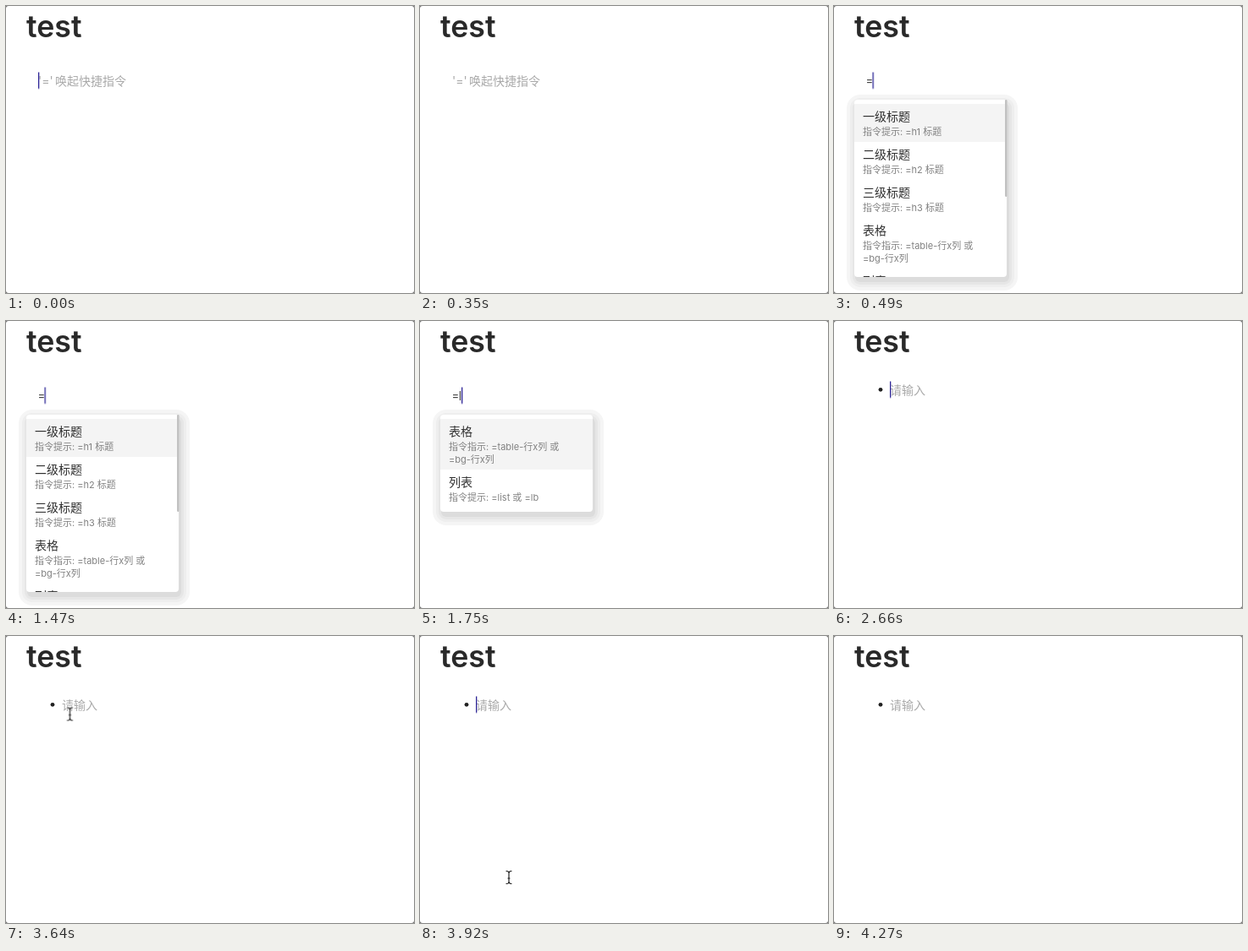
Animation of 482 by 340 pixels, one loop 4760 ms. Source, as an HTML page:

```html
<!DOCTYPE html>
<html lang="zh-CN">
<head>
<meta charset="utf-8">
<title>test</title>
<style>
html, body { margin: 0; width: 100%; height: 100%; overflow: hidden; background: #666; }
svg { display: block; width: 482px; height: 340px; background: #fff; border-radius: 3px; }
text { font: 14px Inter, "Noto Sans CJK SC", "Noto Sans CJK", sans-serif; fill: #303030; }
.title { font-size: 35.7px; font-weight: 600; fill: #292929; }
.ghost { fill: #a9a9a9; }
.typed { font-family: Roboto, "Noto Sans", sans-serif; fill: #444; }
.hint { font-size: 11px; fill: #808080; }

/* Every part shares one 4760 ms clock and changes in hard steps */
.part { opacity: 0; animation: 4760ms step-end infinite; }
.empty { animation-name: empty; }
.all { animation-name: all; }
.two { animation-name: two; }
.one { animation-name: one; }
.bullets { animation-name: bullets; }
.caret { animation-name: caret; fill: #2c2496; }
.mouse { animation-name: mouse; }

@keyframes empty { 0% { opacity: 1 } 10.294%, 100% { opacity: 0 } }
@keyframes all { 0% { opacity: 0 } 10.294% { opacity: 1 } 36.764%, 100% { opacity: 0 } }
@keyframes two { 0% { opacity: 0 } 36.764% { opacity: 1 } 42.647%, 100% { opacity: 0 } }
@keyframes one { 0% { opacity: 0 } 42.647% { opacity: 1 } 55.882%, 100% { opacity: 0 } }
@keyframes bullets { 0% { opacity: 0 } 55.882%, 100% { opacity: 1 } }
@keyframes caret {
  0% { opacity: 1; transform: translate(38px, 78.5px) }
  7.352% { opacity: 0; transform: translate(38px, 78.5px) }
  10.294% { opacity: 1; transform: translate(45.5px, 78.5px) }
  20.588% { opacity: 0; transform: translate(45.5px, 78.5px) }
  30.882% { opacity: 1; transform: translate(45.5px, 78.5px) }
  36.764% { opacity: 1; transform: translate(49px, 78.5px) }
  42.647% { opacity: 1; transform: translate(52.5px, 78.5px) }
  52.941% { opacity: 0; transform: translate(52.5px, 78.5px) }
  55.882% { opacity: 1; transform: translate(66px, 71.5px) }
  67.647% { opacity: 0; transform: translate(66px, 71.5px) }
  77.941% { opacity: 1; transform: translate(66px, 71.5px) }
  89.705%, 100% { opacity: 0; transform: translate(66px, 71.5px) }
}
@keyframes mouse {
  0% { opacity: 0; transform: translate(75.5px, 92.5px) }
  76.47% { opacity: 1; transform: translate(75.5px, 92.5px) }
  77.941% { opacity: 1; transform: translate(152px, 112px) }
  79.411% { opacity: 1; transform: translate(221px, 164px) }
  80.882% { opacity: 1; transform: translate(190px, 236px) }
  82.352% { opacity: 1; transform: translate(105px, 286px) }
  83.823% { opacity: 1; transform: translate(17px, 312px) }
  85.294%, 100% { opacity: 0; transform: translate(17px, 312px) }
}
</style>
</head>
<body>
<svg viewBox="0 0 482 340">
  <defs>
    <clipPath id="frame"><rect x="24" y="111" width="180" height="210" rx="4"/></clipPath>
    <path id="beam" d="M-3 -7.5Q0 -7.5 0 -5Q0 -7.5 3 -7.5M0 -5V5M-3 7.5Q0 7.5 0 5Q0 7.5 3 7.5M-1 1H1"/>
    <g id="table">
      <text x="34" y="20">表格</text>
      <text class="hint" x="34" y="37">指令指示: =table-行x列 或</text>
      <text class="hint" x="34" y="52">=bg-行x列</text>
    </g>
    <g id="list">
      <text x="34" y="20">列表</text>
      <text class="hint" x="34" y="37">指令提示: =list 或 =lb</text>
    </g>
  </defs>

  <text class="title" x="24" y="37">test</text>

  <g class="part empty">
    <text class="ghost" x="38" y="93.5">'='</text>
    <text class="ghost" x="58" y="93.5">唤起快捷指令</text>
  </g>

  <g class="part all">
    <text class="typed" x="38" y="93.5">=</text>
    <g class="panel" data-height="210"></g>
    <g clip-path="url(#frame)">
      <rect x="24" y="116" width="178" height="45" fill="#f4f4f4"/>
      <text x="34" y="136">一级标题</text>
      <text class="hint" x="34" y="153">指令提示: =h1 标题</text>
      <text x="34" y="181">二级标题</text>
      <text class="hint" x="34" y="198">指令提示: =h2 标题</text>
      <text x="34" y="226">三级标题</text>
      <text class="hint" x="34" y="243">指令提示: =h3 标题</text>
      <use href="#table" y="251"/>
      <use href="#list" y="311"/>
    </g>
    <rect x="202" y="111" width="2.5" height="115" rx="1.2" fill="#c2c2c2"/>
  </g>

  <g class="part two">
    <text class="typed" x="38" y="93.5">=l</text>
    <g class="panel" data-height="115"></g>
    <rect x="24" y="116" width="180" height="60" fill="#f4f4f4"/>
    <use href="#table" y="116"/>
    <use href="#list" y="176"/>
  </g>

  <g class="part one">
    <text class="typed" x="38" y="93.5">=li</text>
    <g class="panel" data-height="55"></g>
    <rect x="24" y="116" width="180" height="45" fill="#f4f4f4"/>
    <use href="#list" y="116"/>
  </g>

  <g class="part bullets">
    <circle cx="55" cy="81.3" r="2.4" fill="#222"/>
    <text class="ghost" x="66" y="86.5">请输入</text>
  </g>

  <rect class="part caret" width="1.3" height="19.5"/>

  <g class="part mouse" fill="none" stroke-linecap="round">
    <use href="#beam" stroke="#fff" stroke-width="2.6"/>
    <use href="#beam" stroke="#111" stroke-width="1.1"/>
  </g>
</svg>
<script>
// Soft shadow as nested bands: [spread, colour]
const bands = [[11, '#f5f5f5'], [7, '#eeeeee'], [4, '#e6e6e6'], [1, '#dcdcdc']];

const box = (x, y, w, h, r, fill) =>
  `<rect x="${x}" y="${y}" width="${w}" height="${h}" rx="${r}" fill="${fill}"/>`;

for (const panel of document.querySelectorAll('.panel')) {
  const height = +panel.dataset.height;
  const shadow = bands.map(([s, fill]) =>
    box(26 - s, 116 - s, 180 + 2 * s, height + 2 * s, 5 + s, fill));
  panel.innerHTML = shadow.join('') + box(24, 111, 180, height, 4, '#fff');
}
</script>
</body>
</html>
```
